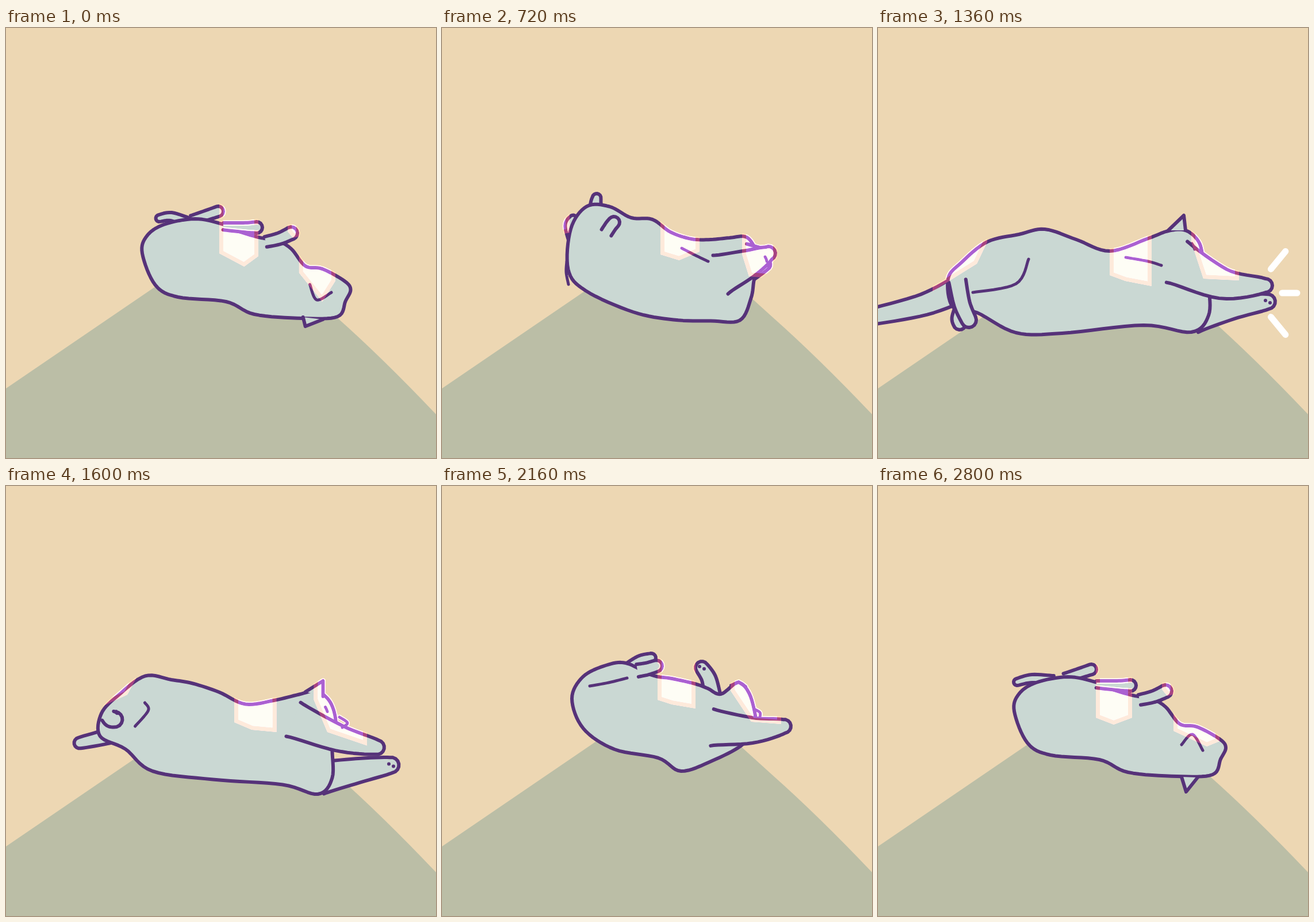
An HTML page with a canvas that plays this animation: 748x748 px, repeating every 2.88 s.

```html
<!DOCTYPE html>
<html lang="en">
<head>
<meta charset="utf-8">
<title>Rolling cat</title>
<style>
  html, body { margin: 0; width: 100%; height: 100%; overflow: hidden; background: #edd7b3; }
  canvas { display: block; }
</style>
</head>
<body>
<canvas id="stage" width="748" height="748"></canvas>
<script>
const SIZE = 748, STEP = 80, FRAMES = 36, LINE = 6;
const INK = '#563279', FUR = '#cad8d3', SAND = '#edd7b3', HILL = '#bbbea6';

// Limbs: base, middle, tip, then the half width at base and tip.
// Body: the same twenty landmarks in every pose, from the face over the belly to the rump and back.
// Sun spots: the lower edge of a shaft of light falling from above.
const tucked = { tail: '285,390 280,388 276,390 8,6', armFar: '440,400 455,400 470,402 6,6' };

const sleep = {
  ...tucked,
  body: '594,440 555,419 525,414 500,384 475,370 442,364 405,353 378,341 330,332 275,342 245,362 237,392 260,447 300,468 385,476 435,498 520,505 582,502 596,475 605,455',
  tail: '305,338 268,335 242,341 8,6',
  legFar: '325,334 350,326 371,319 8,9',
  legNear: '380,345 415,347 439,347 6,10',
  armNear: '455,372 480,366 500,357 9,11',
  ear: '528,506 536,532 556,507',
  eye: '528,450 547,432 565,460',
  sunBelly: '379,403 410,415 442,403',
  sunPaw: '494,354 503,365 516,362',
  sunHead: '514,426 572,453 594,444'
};

const curl = {
  ...tucked,
  body: '522,405 523,388 512,364 488,356 460,354 438,352 405,340 380,318 340,317 290,324 246,341 235,375 255,432 275,454 365,482 405,500 445,492 490,468 515,440 521,420',
  legFar: '325,322 345,310 366,301 7,8',
  legNear: '375,327 405,328 428,328 11,10',
  armFar: '452,365 445,345 441,332 9,11',
  armNear: '444,430 475,370 484,328 34,13',
  ear: '524,387 544,415 523,406',
  sunBelly: '365,386 395,405 431,372',
  sunHead: '504,405 512,424 548,420'
};

const reach = {
  body: '580,425 572,392 548,364 512,374 475,382 430,382 390,370 352,348 318,343 292,297 257,280 213,324 184,408 225,460 300,506 400,515 490,527 546,549 560,500 565,455',
  tail: '176,350 165,300 180,274 12,7',
  legFar: '217,333 190,307 172,290 16,7',
  legNear: '197,385 182,361 170,348 9,10',
  armFar: '550,520 625,506 683,491 30,8',
  armNear: '525,428 590,450 652,456 38,11',
  ear: '536,364 562,349 562,380',
  thigh: '217,406 216,425 220,446',
  eye: '562,398 564,402 565,406',
  fold: '417,383 440,395 463,406',
  sunBelly: '395,402 430,403 465,406',
  sunHip: '172,316 200,360 222,356',
  sunHead: '540,382 556,440 618,452'
};

const stretch = {
  body: '566,404 558,372 535,352 505,353 470,366 403,388 345,368 290,350 245,359 190,372 145,408 122,436 130,485 172,495 240,530 320,531 462,517 545,529 575,500 575,450',
  tail: '150,450 80,481 -20,504 24,13',
  legFar: '145,490 140,505 142,514 12,11',
  legNear: '138,440 146,480 158,508 15,13',
  armFar: '550,500 615,485 678,476 30,13',
  armNear: '520,407 600,445 674,448 40,12',
  ear: '505,352 532,326 535,352',
  thigh: '262,402 240,445 165,460',
  eye: '546,375 549,380 551,385',
  fold: '431,399 470,406 493,413',
  sunBelly: '403,430 430,440 476,449',
  sunHip: '95,458 172,410 190,372',
  sunHead: '545,372 566,436 628,439'
};

const kick = {
  ...tucked,
  body: '582,422 570,380 545,362 515,372 466,379 430,371 396,349 360,337 330,315 294,289 246,320 210,355 197,385 243,420 270,462 400,490 500,522 540,543 560,515 560,455',
  legFar: '240,322 256,306 270,298 10,8',
  legNear: '221,360 220,330 220,304 14,14',
  armFar: '545,515 610,505 662,495 27,14',
  armNear: '480,405 560,433 617,461 24,13',
  ear: '537,364 571,352 568,380',
  thigh: '221,352 255,336 284,376',
  eye: '565,394 566,397 567,400',
  nose: '580,402 594,412 585,420',
  sunBelly: '391,392 425,408 465,407',
  sunHip: '236,310 250,316 262,298',
  sunHead: '526,372 552,420 628,464'
};

const roll = {
  ...tucked,
  body: '546,405 535,362 515,342 485,362 462,352 440,344 400,335 365,329 320,308 285,312 245,332 226,370 246,422 300,458 376,473 416,496 470,478 520,452 535,430 543,415',
  legFar: '325,315 345,303 364,299 8,8',
  legNear: '340,321 357,318 373,313 11,10',
  armFar: '470,362 464,335 452,316 14,11',
  armNear: '470,420 540,425 595,418 32,12',
  ear: '503,347 516,341 528,349',
  thigh: '257,348 290,342 322,334',
  nose: '543,388 553,394 553,402',
  sunBelly: '375,372 400,380 441,387',
  sunHead: '502,356 538,410 590,414'
};

const SHAPES = ['tail', 'armFar', 'legFar', 'body', 'ear', 'legNear', 'armNear'];
const LINES = ['thigh', 'eye', 'fold', 'nose'];
const GLOWS = ['sunBelly', 'sunHip', 'sunPaw', 'sunHead'];
const NAMES = [...SHAPES, ...LINES, ...GLOWS];

const mix = (a, b, k) => a + (b - a) * k;
const parse = s => s.split(' ').map(p => p.split(',').map(Number));

function readPose(at, source) {
  const pose = { at };
  for (const n of NAMES) if (source[n]) pose[n] = parse(source[n]);
  return pose;
}

// The loop begins with the sleeper drawn in a little towards the rump.
const first = readPose(0, {
  ...sleep,
  tail: '318,338 288,328 267,331 8,6',
  ear: '521,503 525,519 556,507',
  eye: '533,446 545,473 571,460',
  sunBelly: '373,392 417,415 442,397',
  sunHead: '514,426 555,476 578,440'
});
const PULL = .985, RUMP = 237;
for (const n of NAMES) if (first[n])
  first[n] = first[n].map(([x, y]) => x < RUMP ? [x, y] : [mix(RUMP, x, PULL), y]);

const poses = [first, readPose(5, curl), readPose(13, reach), readPose(17, stretch),
  readPose(23, kick), readPose(27, roll), readPose(35, sleep)];

function poseAt(frame) {
  let i = poses.length - 1;
  while (poses[i].at > frame) i--;
  const a = poses[i], b = poses[(i + 1) % poses.length];
  const end = b.at > a.at ? b.at : FRAMES;
  let k = (frame - a.at) / (end - a.at);
  k = k * k * (3 - 2 * k);
  const out = {};
  for (const n of NAMES) {
    const p = a[n], q = b[n];
    out[n] = p && q ? p.map((pt, j) => pt.map((v, x) => mix(v, q[j][x], k))) : k < .5 ? p : q;
  }
  return out;
}

// Catmull-Rom curve as a fine polyline.
function spline(pts, closed) {
  const len = pts.length, out = [];
  const get = i => closed ? pts[(i + len) % len] : pts[Math.max(0, Math.min(len - 1, i))];
  for (let i = 0; i < (closed ? len : len - 1); i++) {
    const [a, b, c, d] = [-1, 0, 1, 2].map(n => get(i + n));
    for (let u = 0; u < 1; u += .125)
      out.push([0, 1].map(x => b[x] + u / 2 * (c[x] - a[x] +
        u * (2 * a[x] - 5 * b[x] + 4 * c[x] - d[x] + u * (3 * (b[x] - c[x]) + d[x] - a[x])))));
  }
  out.push(closed ? out[0] : pts[len - 1]);
  return out;
}

// Outline of a limb: along one side, around the paw and back, open at the base.
function limb(pts, shrink = 0) {
  const [r0, r1] = pts[3], bone = spline(pts.slice(0, 3)), last = bone.length - 1;
  const left = [], right = [], cap = [];
  let turn = 0;
  bone.forEach(([x, y], i) => {
    const p = bone[Math.max(0, i - 1)], q = bone[Math.min(last, i + 1)];
    const r = Math.max(0, mix(r0, r1, i / last) - shrink);
    turn = Math.atan2(q[1] - p[1], q[0] - p[0]);
    const dx = Math.sin(turn) * r, dy = -Math.cos(turn) * r;
    left.push([x + dx, y + dy]);
    right.unshift([x - dx, y - dy]);
  });
  const r = Math.max(0, r1 - shrink), [x, y] = bone[last];
  for (let i = 1; i < 8; i++) {
    const a = turn + Math.PI * (i / 8 - .5);
    cap.push([x + Math.cos(a) * r, y + Math.sin(a) * r]);
  }
  return [...left, ...cap, ...right];
}

function outline(name, pts) {
  if (name === 'body') return spline(pts, true);
  return name === 'ear' ? pts : limb(pts);
}

function makeLayer(canvas) {
  canvas.width = canvas.height = SIZE;
  const c = canvas.getContext('2d');
  c.lineCap = c.lineJoin = 'round';
  return c;
}
const main = makeLayer(document.getElementById('stage'));
const mask = makeLayer(document.createElement('canvas'));
const light = makeLayer(document.createElement('canvas'));

function trace(c, pts) {
  c.beginPath();
  pts.forEach(p => c.lineTo(p[0], p[1]));
}

function stroke(c, pts, width, color) {
  trace(c, pts);
  c.lineWidth = width;
  c.strokeStyle = color;
  c.stroke();
}

function drawToes(c, [, , [x, y]]) {
  for (const side of [-1, 1]) {
    const toe = [x + side * 4, y + side * 2];
    stroke(c, [toe, toe], LINE, INK);
  }
}

function drawCat(c, pose, grow) {
  c.fillStyle = FUR;
  for (const n of SHAPES) if (pose[n]) {
    const shape = outline(n, pose[n]);
    trace(c, shape);
    c.fill();
    stroke(c, shape, LINE + grow, INK);
    if (n === 'armFar') drawToes(c, pose[n]);
  }
  for (const n of LINES) if (pose[n]) stroke(c, spline(pose[n]), LINE - 1 + grow, INK);
}

// Sunlight is added to fur and ink alike, with a warmer rim.
function drawLight(pose) {
  mask.clearRect(0, 0, SIZE, SIZE);
  drawCat(mask, pose, 3);
  light.clearRect(0, 0, SIZE, SIZE);
  for (const n of GLOWS) if (pose[n]) {
    const low = pose[n], shaft = [[low[0][0], 0], ...low, [low[2][0], 0]];
    light.save();
    trace(light, shaft);
    light.clip();
    light.fillStyle = 'rgb(84,47,88)';
    light.fill();
    stroke(light, shaft, 14, 'rgb(80,18,8)');
    light.restore();
  }
  // The near hind leg keeps its inside in shade.
  light.globalCompositeOperation = 'destination-out';
  trace(light, limb(pose.legNear, 5));
  light.fill();
  light.globalCompositeOperation = 'destination-in';
  light.drawImage(mask.canvas, 0, 0);
  main.globalCompositeOperation = 'lighter';
  main.drawImage(light.canvas, 0, 0);

  light.globalCompositeOperation = 'source-in';
  light.fillStyle = '#fefdf5';
  light.fillRect(0, 0, SIZE, SIZE);
  main.globalCompositeOperation = 'darken';
  main.drawImage(light.canvas, 0, 0);
  light.globalCompositeOperation = main.globalCompositeOperation = 'source-over';
}

// A dash of an arc that sweeps down with the tail (u = 0 to 1) or back up.
function drawSwoosh(u) {
  const from = Math.max(0, u), to = Math.min(1, u + .35);
  if (to < from) return;
  const pts = [];
  for (let i = 0; i <= 16; i++) {
    const a = mix(3.964, 1.822, mix(from, to, i / 16));
    pts.push([254.5 + 138.8 * Math.cos(a), 355.6 + 138.8 * Math.sin(a)]);
  }
  stroke(main, pts, 11, '#fff');
}

// Three rays burst from the paws; v runs from -1 to 1.
function drawBurst(v) {
  const from = Math.max(0, v) * .6, to = Math.min(1, 1 + v * .5);
  for (const side of [-1, 0, 1]) {
    const a = side * .88, length = 26 + 14 * Math.abs(side);
    stroke(main, [from, to].map(s => {
      const r = 54 + length * s;
      return [649 + r * Math.cos(a), 461 + r * Math.sin(a)];
    }), 11, '#fff');
  }
}

function drawScene(frame) {
  main.fillStyle = SAND;
  main.fillRect(0, 0, SIZE, SIZE);
  main.fillStyle = HILL;
  main.fill(new Path2D('M0 627L270 443L320 420H480L522 455L575 503Q655 574 748 672V748H0Z'));
  const pose = poseAt(frame);
  drawCat(main, pose, 0);
  drawLight(pose);
  if (frame >= 10 && frame <= 13) drawSwoosh((frame - 10) / 3);
  if (frame >= 21 && frame <= 23) drawSwoosh((23 - frame) * .4);
  if (frame >= 16 && frame <= 18) drawBurst(frame - 17);
}

let shown = -1;
const start = performance.now();
function tick() {
  const frame = Math.floor((performance.now() - start) / STEP) % FRAMES;
  if (frame !== shown) drawScene(shown = frame);
  requestAnimationFrame(tick);
}
tick();
</script>
</body>
</html>
```
